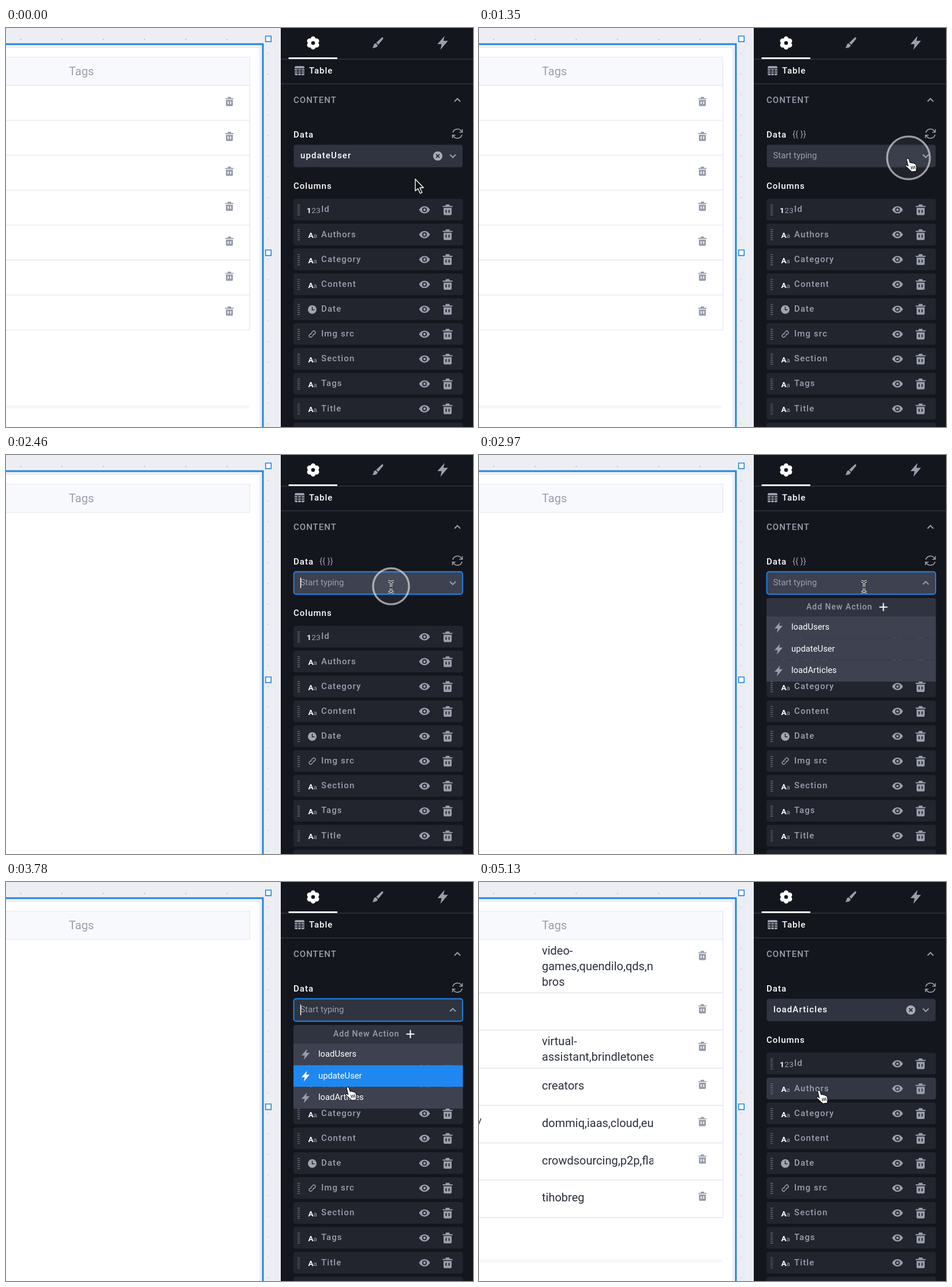
Animation of 809x692 px, one loop 5.25 s. Source, as an HTML page:

```html
<!DOCTYPE html>
<html lang="en">
<head>
<meta charset="utf-8">
<title>Binding a table to an action</title>
<style>
  html, body { margin: 0; width: 100%; height: 100%; overflow: hidden; background: #14161d; }
  svg { display: block; font: 500 15px Roboto, sans-serif; }
  .cell { font: 400 20px Roboto, sans-serif; fill: #2b303c; }
  .head { font: 400 20px Roboto, sans-serif; fill: #9b9fad; }
  .label { fill: #fff; letter-spacing: 1px; }
  .muted { fill: #9a9fad; letter-spacing: 1.1px; }
  .plain { font: 400 14.8px Roboto, sans-serif; }
  .line { fill: none; stroke: #9a9fad; stroke-width: 2; }
</style>
</head>
<body>
<svg id="stage" width="809" height="692" viewBox="0 0 809 692">
  <defs>
    <path id="trash" fill-rule="evenodd" d="M-8.5-6.8h5v-1.4q0-1.2 1.2-1.2h4.6q1.2 0 1.2 1.2v1.4h5v2h-17z
      M-7-3.4h14v10.6q0 2-2 2h-10q-2 0-2-2zM-3.6 0h2v5h-2zM1.6 0h2v5h-2z"/>
    <path id="eye" fill-rule="evenodd" d="M-9.5 0C-5-8.4 5-8.4 9.5 0C5 8.4-5 8.4-9.5 0z
      M-4 0a4 4 0 0 0 8 0a4 4 0 0 0-8 0zM-2.2 0a2.2 2.2 0 0 0 4.4 0a2.2 2.2 0 0 0-4.4 0z"/>
    <path id="bolt" d="M2.5-9L-7 2h5.5l-1.5 7.5L7-2.5H1z"/>
    <path id="chevron" d="M-5-2.5L0 2.5 5-2.5"/>
    <clipPath id="cellClip"><path d="M0 99H302V600H0z"/></clipPath>
  </defs>
</svg>
<script>
const LOOP = 5250;
const BLUE = '#1e88f0';
const stage = document.getElementById('stage');

const range = (n, f) => Array.from({ length: n }, (_, i) => f(i)).join('');
const use = (id, x, y, fill, scale = 1) =>
  `<use href="#${id}" transform="translate(${x} ${y}) scale(${scale})" fill="${fill}"/>`;
const text = (x, y, cls, s, extra = '') => `<text x="${x}" y="${y}" class="${cls}" ${extra}>${s}</text>`;

// Table on the left; "edges" are the row boundaries.
const emptyEdges = Array.from({ length: 8 }, (_, i) => 99.5 + 60.6 * i);
const articleEdges = [99.5, 192, 257, 323, 387.5, 452.5, 517, 582];
const articleTags = [
  ['video-', 'games,quendilo,qds,no', 'bros'],
  [],
  ['virtual-', 'assistant,brindletones'],
  ['creators'],
  ['dommiq,iaas,cloud,eur'],
  ['crowdsourcing,p2p,flat'],
  ['tihobreg'],
];

function tableRows(id, edges, cells = []) {
  const lines = edges.slice(1).map(y => `M0 ${y}H422.5`).join('');
  const icons = edges.slice(0, -1).map(y => use('trash', 387, y + 28, '#989dab', .86)).join('');
  const words = cells.map((rows, i) => rows.map((s, k) => {
    const first = rows.length > 1 ? 26 : 37;
    return text(109, edges[i] + first + 27 * k, 'cell', s);
  }).join('')).join('');
  return `<g id="${id}">
    <path d="${lines}M422.5 99V${edges[7]}" fill="none" stroke="#e5e7ee" stroke-width="1.3"/>
    ${icons}<g clip-path="url(#cellClip)">${words}</g>
    <path d="M0 654H421V660H0z" fill="#f7f8fb"/></g>`;
}

const handle = y => `<path d="M449.7 ${y}h9.6v9.6h-9.6z" fill="#fff" stroke="#2384e4" stroke-width="1.6"/>`;

const canvasArea = `
  <path d="M0 0H476V692H0z" fill="#edeef3"/>
  <g fill="#c3c7d1">
    ${range(6, i => `<circle cx="${25.5 + 71.5 * i}" cy="19.7" r="1.2"/>`)}
    ${range(19, i => `<circle cx="454" cy="${44 + 35.7 * i}" r="1"/>`)}
  </g>
  <path d="M0 28H445V692H0z" fill="#f1f2f6"/>
  <path d="M-2 33.5H434q6 0 6 6V694H-2z" fill="#fff" stroke="#e0e3ea"/>
  <path d="M-2 28H445V694" fill="none" stroke="#2384e4" stroke-width="3"/>
  ${handle(14)}${handle(385)}
  <path d="M-2 50.5H422.5V99.5H-2z" fill="#f8f9fd" stroke="#e5e7ee" stroke-width="1.2"/>
  ${text(109, 82, 'head', 'Tags')}
  ${tableRows('emptyRows', emptyEdges)}
  ${tableRows('articleRows', articleEdges, articleTags)}
  <g id="slash">${text(-3.5, 425, 'cell', '/')}</g>`;

// Column list in the side panel.
const columns = ['Id', 'Authors', 'Category', 'Content', 'Date', 'Img src', 'Section', 'Tags', 'Title', ''];

function typeIcon(name) {
  if (name === 'Id')
    return `<text x="521" y="25" font-size="13.5" fill="#9a9fad" letter-spacing=".5" font-weight="400"><tspan fill="#fff" font-weight="700">1</tspan>23</text>`;
  if (name === 'Date')
    return '<circle cx="530.5" cy="19.5" r="7.5" fill="#a2a5ad"/><path d="M530.5 14.5v5.5h4" fill="none" stroke="#22252e" stroke-width="1.5"/>';
  if (name === 'Img src')
    return `<g transform="translate(530.5 19) rotate(-45)" class="line" style="stroke-width:1.4">
      <path d="M-1.5-2.6H-4a2.6 2.6 0 0 0 0 5.2H-.5a2.6 2.6 0 0 0 2.4-2M1.5 2.6H4a2.6 2.6 0 0 0 0-5.2H.5a2.6 2.6 0 0 0-2.4 2"/></g>`;
  return `<text x="523.5" y="25" font-size="13.5" fill="#9a9fad"><tspan fill="#fff" font-weight="700">A</tspan><tspan font-size="11.5" font-weight="400">a</tspan></text>`;
}

const columnRow = (name, i) => `<g transform="translate(0 ${296.2 + 43.15 * i})">
  <rect id="column${i}" x="498" width="293.5" height="37.6" rx="4" fill="#22252e"/>
  <path d="M507 10V29" stroke="#6c717e" stroke-width="4.4" stroke-dasharray="1.2 2.3"/>
  ${typeIcon(name)}${text(546, 23.2, 'muted', name)}
  ${use('eye', 725, 19, '#9a9fad')}${use('trash', 765, 19.2, '#9a9fad')}</g>`;

const option = (name, i) => `<g transform="translate(0 ${280 + 37.7 * i})">
  <path id="option${i}" d="M498 0H791.5V37.7H498z"/>
  <g id="optionBolt${i}">${use('bolt', 519, 18.7, 'inherit')}</g>
  ${text(541, 23, 'plain', name, 'fill="#fff"')}</g>`;

const panel = `
  <path d="M476 0H809V692H476z" fill="#14161d"/>
  <path d="M476 54H809M476 96.7H809" stroke="#30343d" stroke-width="1.4"/>
  <path d="M489.5 52.3H574" stroke="#fff" stroke-width="2.8"/>
  <g transform="translate(532 26)" fill="#fff">
    ${range(6, i => `<circle r="4.4" cy="-7" transform="rotate(${60 * i})"/>`)}
    <circle r="8"/><circle r="3.3" fill="#14161d"/>
  </g>
  <g transform="translate(644 26)" fill="#9a9fad">
    <path d="M9-9.6q1.4 1-.2 3L1 3-2.6-.6 6.4-9Q8-10.4 9-9.6z"/>
    <path d="M-3.6.4L0 4Q-1 9-9.5 8.6Q-7.6 7-7.3 4.4Q-6.6 1-3.6.4z"/>
  </g>
  ${use('bolt', 756.5, 25.5, '#9a9fad', 1.3)}
  <g transform="translate(500 66)">
    <rect width="17" height="16" rx="2.5" fill="#9a9fad"/>
    <path d="M0 4.7H17M0 8.5H17M0 12.2H17M5.6 5V16M11.4 5V16" stroke="#14161d" stroke-width="1.3"/>
  </g>
  ${text(525, 79.3, 'label', 'Table')}
  ${text(498, 129.8, 'muted', 'CONTENT', 'style="letter-spacing:1px"')}
  <use href="#chevron" class="line" transform="translate(782 125) scale(1 -1)"/>
  ${text(498, 189.6, 'label', 'Data')}
  ${text(543, 189.3, 'plain', '{{ }}', 'id="braces" fill="#9a9fad"')}
  <path class="line" style="stroke-width:1.6" d="M774 181.5a8.2 8.2 0 0 1 15.3-1.6M790.5 175.5v5.2h-5.2M790 185a8.2 8.2 0 0 1-15.3 1.6M773.5 191v-5.2h5.2"/>
  <rect id="field" x="498.5" y="202.5" width="292.5" height="39" rx="4" stroke-width="1.8"/>
  ${text(510, 226.4, 'label', '', 'id="value" style="letter-spacing:1.1px"')}
  ${text(509.5, 226.4, 'plain', 'Start typing', 'id="hint" fill="#9a9fad"')}
  <path id="caret" d="M510.5 212.5V231" stroke="#fff" stroke-width="1.4"/>
  <g id="clear"><circle id="clearDisc" cx="748" cy="222" r="8"/>
    <path d="M745 219l6 6M751 219l-6 6" stroke="#2c313c" stroke-width="1.8"/></g>
  <use id="arrowIcon" href="#chevron" class="line"/>
  ${text(498, 278.5, 'label', 'Columns')}
  ${columns.map(columnRow).join('')}
  <g id="menu">
    <path d="M498 280V252q0-4 4-4H787.5q4 0 4 4V280z" fill="#2f3440"/>
    ${text(567, 268.3, 'muted', 'Add New Action', 'font-size="14" style="letter-spacing:1px"')}
    <path d="M693.5 263.8h14M700.5 256.8v14" stroke="#fff" stroke-width="2"/>
    ${['loadUsers', 'updateUser', 'loadArticles'].map(option).join('')}
  </g>`;

const pointers = `
  <circle id="ring" stroke="#fff" stroke-width="3.4" fill="#fff" fill-opacity=".1"/>
  <g id="pointer">
    <path id="arrow" d="M0 0V20.5L4.6 16.4 8.4 24.8 11.8 23.3 8 15H14.2z" fill="#101116" stroke="#fff" stroke-width="1.4" stroke-linejoin="round"/>
    <g id="beam" fill="none">
      <path d="M-5-9.5Q0-9.5 0-6Q0-9.5 5-9.5M0-7V8M-5 9.5Q0 9.5 0 6Q0 9.5 5 9.5" stroke="#fff" stroke-width="3.6"/>
      <path d="M-5-9.5Q0-9.5 0-6Q0-9.5 5-9.5M0-7V8M-5 9.5Q0 9.5 0 6Q0 9.5 5 9.5M-2 1.5H2" stroke="#111" stroke-width="1.3"/>
    </g>
    <g id="hand" transform="translate(0 .5)" stroke="#111" stroke-width="1.2" stroke-linejoin="round">
      <path fill="#fff" d="M-3 3q-.8-3 1.4-3.4q2-.4 2.8 2.4l1.6 5.2q2.2-1 3.4.6q2.4-.9 3.4.8q2.6-.4 3.4 2l.9 4q.6 2.6-.6 4.6l.3 2.6-8.6 1-.8-1.6c-2.4-1.4-3.8-3.2-5.6-5l-3.2-2.6q-1.2-1.8.6-2.4q1.6-.3 3.4 1.6z"/>
      <path fill="none" d="M4.6 13.5l1.1 5M7.4 13l1.1 5M10.2 12.6l1 5"/>
    </g>
  </g>`;

stage.insertAdjacentHTML('beforeend', canvasArea + panel + pointers);

const el = {};
stage.querySelectorAll('[id]').forEach(node => el[node.id] = node);
const show = (id, on) => el[id].style.display = on ? '' : 'none';
const set = (id, attrs) => Object.entries(attrs).forEach(([k, v]) => el[id].setAttribute(k, v));
const clamp = v => Math.min(1, Math.max(0, v));
const smooth = p => p * p * (3 - 2 * p);

// Pointer moves: start, end, destination.
const moves = [[30, 540, 744, 226], [1680, 2070, 667, 228.5], [3150, 3870, 590, 361]];
const clicks = [1110, 2310, 4380];

function pointerAt(t) {
  let x = 709, y = 262;
  for (const [from, to, tx, ty] of moves) {
    const p = smooth(clamp((t - from) / (to - from)));
    x += (tx - x) * p;
    y += (ty - y) * p;
  }
  return [x, y];
}

function draw(t) {
  const [x, y] = pointerAt(t);
  const lagY = pointerAt(t - 50)[1];
  const cleared = t >= 1230 && t < 4620;
  const focused = t >= 2430 && t < 4620;
  const open = t >= 2580 && t < 4620;
  const overField = lagY < 242;

  show('emptyRows', t < 1500);
  show('articleRows', t >= 5070);
  show('slash', t >= 5070);

  show('braces', overField);
  set('field', {
    fill: focused && overField ? '#3d4150' : '#2f3440',
    stroke: focused ? BLUE : 'none',
  });
  el.value.textContent = cleared ? '' : t < 1230 ? 'updateUser' : 'loadArticles';
  show('hint', cleared);
  show('caret', focused && Math.floor((t - 2430) / 530) % 2 === 0);
  show('clear', !cleared);
  const glow = 170 + 50 * clamp((t - 540) / 210) * (t < 1230);
  set('clearDisc', { fill: `rgb(${glow},${glow + 3},${glow + 12})` });
  const flipped = t >= 2850 && t < 4620;
  set('arrowIcon', { transform: `translate(774 222) scale(1 ${flipped ? -1 : 1})` });

  show('menu', open);
  const hovered = lagY < 280 ? -1 : Math.floor((lagY - 280) / 37.7);
  for (let i = 0; i < 3; i++) {
    set('option' + i, { fill: i === hovered ? BLUE : '#3d4150' });
    set('optionBolt' + i, { fill: i === hovered ? '#fff' : '#9a9fad' });
  }
  set('column1', { fill: t >= 4650 ? '#323743' : '#22252e' });

  const click = clicks.find(c => t >= c && t < c + 480);
  show('ring', click !== undefined);
  if (click !== undefined) {
    const p = (t - click) / 480;
    set('ring', { cx: x, cy: y - .8, r: 20 + 38 * p - 8 * p * p, opacity: .58 * clamp((1 - p) * 2) });
  }

  const onHand = (t > 400 && t < 1740) || y > 280;
  set('pointer', { transform: `translate(${x} ${y})` });
  show('hand', onHand);
  show('beam', !onHand && y < 242);
  show('arrow', !onHand && y >= 242);
}

function tick(now) {
  draw(now % LOOP);
  requestAnimationFrame(tick);
}
draw(0);
requestAnimationFrame(tick);
</script>
</body>
</html>
```
